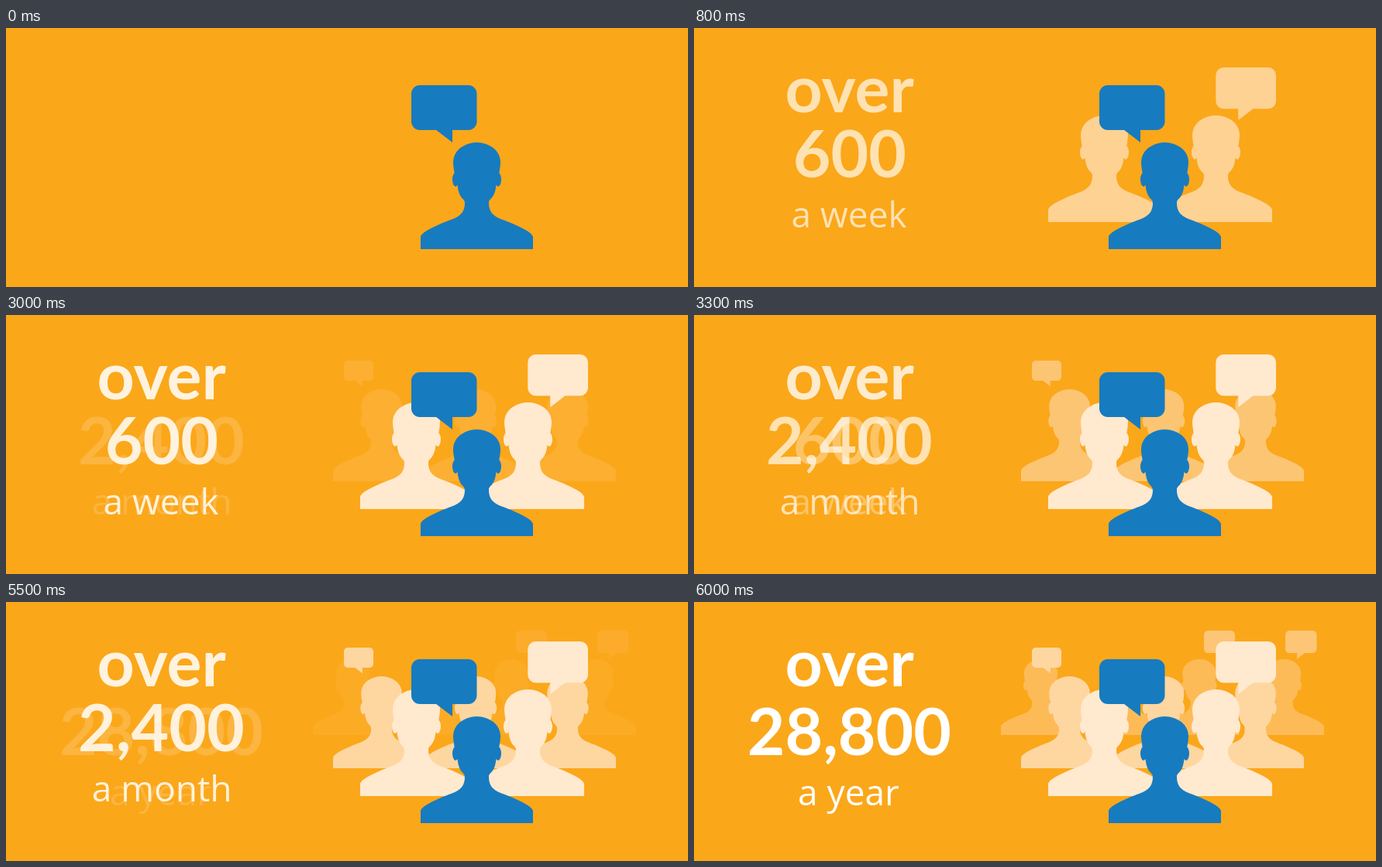
An HTML page with a canvas for the animation above (8 s loop, 880 by 335 pixels).

```html
<!DOCTYPE html>
<html lang="en">
<head>
<meta charset="utf-8">
<title>Growing crowd</title>
<style>
  html, body { margin: 0; width: 100%; height: 100%; overflow: hidden; background: #fba71a; }
  canvas { display: block; }
</style>
</head>
<body>
<canvas id="stage" width="880" height="335"></canvas>
<script>
const ctx = document.getElementById('stage').getContext('2d');
const LOOP = 8000, STEP = 100, STEPS = 6;
const BG = '#fba71a', BLUE = '#177bc0';
const CREAM = '#ffe9cf', PEACH = '#fed6a0', AMBER = '#fdbb58', APRICOT = '#fdc576';
const BIG = '700 84px Lato, sans-serif';
const SMALL = '400 46px "Open Sans", sans-serif';

// Crown at the origin: mirrored shoulder, neck and cheek curves, a half-ellipse skull, two ears.
const bust = (() => {
  const left = [
    [-72.5, 122],
    [-71, 115], [-47, 105], [-32, 99.5],
    [-20, 95], [-15.5, 89], [-15.5, 78],
    [-15.5, 72], [-23, 74], [-25, 55],
    [-28, 45], [-30.5, 33], [-30.5, 25]
  ];
  const right = left.map(([x, y]) => [-x, y]).reverse();
  const path = new Path2D();
  const curves = pts => {
    for (let i = 1; i < pts.length; i += 3) {
      path.bezierCurveTo(...pts[i], ...pts[i + 1], ...pts[i + 2]);
    }
  };
  path.moveTo(-72.5, 138);
  path.lineTo(...left[0]);
  curves(left);
  path.ellipse(0, 25, 30.5, 25, 0, Math.PI, 2 * Math.PI);
  curves(right);
  path.lineTo(72.5, 138);
  path.closePath();
  for (const x of [-27.5, 27.5]) {
    path.moveTo(x + 4, 48);
    path.ellipse(x, 48, 4, 9, 0, 0, 2 * Math.PI);
  }
  return path;
})();

function people(centres, top, scale, color) {
  ctx.fillStyle = color;
  for (const cx of centres) {
    ctx.save();
    ctx.translate(cx, top);
    ctx.scale(scale, scale);
    ctx.fill(bust);
    ctx.restore();
  }
}

// Corner radius and tail follow the width; side = -1 mirrors the tail.
function bubble(x, y, w, h, side, color) {
  ctx.save();
  ctx.translate(x + w / 2, y);
  ctx.scale(side, 1);
  ctx.fillStyle = color;
  ctx.beginPath();
  ctx.roundRect(-w / 2, 0, w, h, w * 0.13);
  ctx.moveTo(w * 0.127, h - 1);
  ctx.lineTo(w * 0.127, h + w * 0.19);
  ctx.lineTo(-w * 0.12, h);
  ctx.lineTo(-w * 0.12, h - 1);
  ctx.closePath();
  ctx.fill();
  ctx.restore();
}

// Centres the inked part of a line on cx.
function line(text, font, cx, baseline) {
  ctx.font = font;
  const m = ctx.measureText(text);
  ctx.fillText(text, cx - (m.actualBoundingBoxRight - m.actualBoundingBoxLeft) / 2, baseline);
}

function caption(count, period, cx, baseline, alpha) {
  ctx.globalAlpha = alpha;
  ctx.fillStyle = '#fff';
  line('over', BIG, 202, 109);
  line(count, BIG, cx, baseline);
  line(period, SMALL, cx - 0.5, baseline + 65);
}

function fade(t, start) {
  const step = Math.floor((t - start) / STEP) + 1;
  return Math.min(Math.max(step / STEPS, 0), 1);
}

function draw(t) {
  const week = fade(t, 500), month = fade(t, 3000), year = fade(t, 5500);

  ctx.globalAlpha = 1;
  ctx.fillStyle = BG;
  ctx.fillRect(0, 0, 880, 335);

  ctx.globalAlpha = year;
  people([447.5, 557, 652, 761.5], 74, 0.71, AMBER);
  bubble(658, 37, 40, 29, 1, APRICOT);
  bubble(763, 37, 40.5, 29, -1, APRICOT);

  ctx.globalAlpha = month;
  people([484.5, 606, 724.5], 96, 0.862, PEACH);
  bubble(436, 59, 38, 26, 1, PEACH);

  ctx.globalAlpha = week;
  people([529.5, 673.5], 113, 1, CREAM);
  bubble(673.3, 51, 77.7, 53.5, -1, CREAM);

  ctx.globalAlpha = 1;
  people([607.5], 148, 1, BLUE);
  bubble(523, 74, 84.5, 58, 1, BLUE);

  caption('600', 'a week', 201.5, 193, week * (1 - month));
  caption('2,400', 'a month', 201, 193, month * (1 - year));
  caption('28,800', 'a year', 201, 198, year);
}

function tick() {
  draw(performance.now() % LOOP);
  requestAnimationFrame(tick);
}
tick();
</script>
</body>
</html>
```
